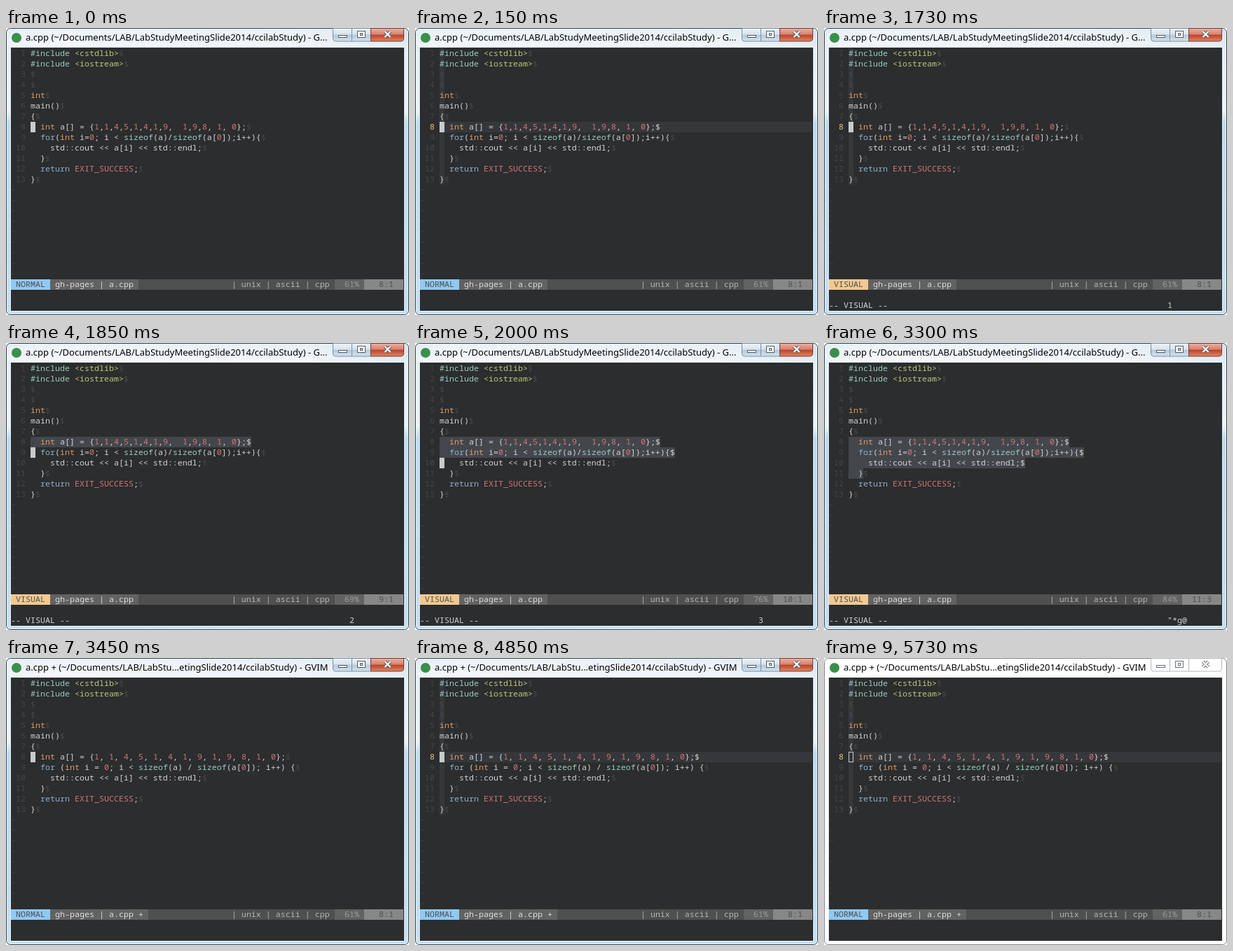
Write an HTML page that moves like this. It is 575 px wide and 410 px high and loops after 5.81 s.

```html
<!DOCTYPE html>
<html lang="en">
<head>
<meta charset="utf-8">
<title>Editor formatting demo</title>
<style>
  html, body { margin: 0; width: 100%; height: 100%; overflow: hidden; background: #fff; }
  svg { display: block; width: 575px; height: 410px; }
  text { white-space: pre; }
  .mono text { font: 11.667px "Noto Sans Mono", "DejaVu Sans Mono", monospace; fill: #d0d3d1; }
  .title { font: 13px "Noto Sans", "Open Sans", sans-serif; fill: #000; }
  .mono .dim { fill: #43474c; }
  .mono .lit { fill: #d0d3d1; }
  .mono .current { fill: #f1ca7d; }
  .mono .dark { fill: #2b2d2e; }
  .pre { fill: #9bcac4; }
  .str { fill: #bfc779; }
  .type { fill: #e09a69; }
  .num { fill: #d47474; }
  .key { fill: #90b0cb; }
</style>
</head>
<body>
<svg id="stage" viewBox="0 0 575 410">
  <defs>
    <linearGradient id="glass" x2="0" y2="1">
      <stop offset="0" stop-color="#d3e1ee"/>
      <stop offset=".07" stop-color="#e6eff7"/>
      <stop offset=".29" stop-color="#edf4fa"/>
      <stop offset=".33" stop-color="#bfdaf0"/>
      <stop offset="1" stop-color="#c6dff3"/>
    </linearGradient>
    <linearGradient id="glow" x2="1" y2="0">
      <stop offset="0" stop-color="#fff" stop-opacity=".4"/>
      <stop offset=".1" stop-color="#fff" stop-opacity=".6"/>
      <stop offset=".75" stop-color="#fff" stop-opacity=".5"/>
      <stop offset="1" stop-color="#fff" stop-opacity="0"/>
    </linearGradient>
    <linearGradient id="button" x2="0" y2="1">
      <stop offset="0" stop-color="#eef4f9"/>
      <stop offset=".48" stop-color="#d6e2ec"/>
      <stop offset=".5" stop-color="#b5c8d9"/>
      <stop offset="1" stop-color="#d3e3f0"/>
    </linearGradient>
    <linearGradient id="close" x2="0" y2="1">
      <stop offset="0" stop-color="#e9b3a4"/>
      <stop offset=".48" stop-color="#d4806c"/>
      <stop offset=".5" stop-color="#bb3f27"/>
      <stop offset="1" stop-color="#dc8a66"/>
    </linearGradient>
  </defs>
  <g id="frame"></g>
  <g id="editor" class="mono"></g>
</svg>
<script>
const LOOP = 5810, CHAR = 7, LINE = 15, LEFT = 7, RIGHT = 568, TOP = 29, CODE_LEFT = 35;
const STATUS_ROW = 23, COMMAND_ROW = 25;

const steps = [
  [0, {}],
  [150, { hold: true }],
  [1730, { visual: true, hold: true, command: '1' }],
  [1850, { visual: true, row: 9, command: '2' }],
  [2000, { visual: true, row: 10, command: '3' }],
  [2150, { visual: true, row: 11, command: '4' }],
  [2270, { visual: true, row: 11, col: 3, command: '4' }],
  [3300, { visual: true, row: 11, col: 3, command: '"*g@', cursor: false }],
  [3450, { tidy: true }],
  [4850, { tidy: true, hold: true }],
  [5730, { tidy: true, hold: true, idle: true }]
];

const messy = [
  '#include <cstdlib>', '#include <iostream>', '', '', 'int', 'main()', '{',
  '  int a[] = {1,1,4,5,1,4,1,9,  1,9,8, 1, 0};',
  '  for(int i=0; i < sizeof(a)/sizeof(a[0]);i++){',
  '    std::cout << a[i] << std::endl;',
  '  }', '  return EXIT_SUCCESS;', '}'
];
const formatted = messy.slice();
formatted[7] = '  int a[] = {1, 1, 4, 5, 1, 4, 1, 9, 1, 9, 8, 1, 0};';
formatted[8] = '  for (int i = 0; i < sizeof(a) / sizeof(a[0]); i++) {';

const escape = s => s.replace(/&/g, '&amp;').replace(/</g, '&lt;').replace(/>/g, '&gt;');
const rect = (x, y, w, h, fill, extra = '') =>
  `<rect x="${x}" y="${y}" width="${w}" height="${h}" fill="${fill}" ${extra}/>`;
const path = (d, fill, stroke, width = 1) =>
  `<path d="${d}" fill="${fill}" stroke="${stroke}" stroke-width="${width}"/>`;
const rowTop = row => TOP + (row - 1) * LINE;
const markup = (x, row, body, cls = '') =>
  `<text x="${x}" y="${rowTop(row) + 11}" class="${cls}">${body}</text>`;
const label = (x, row, text, cls) => markup(x, row, escape(text), cls);

const tokens = /(#include|\bsizeof\b)|(<\w+>)|(\bint\b)|(\b\d+\b|EXIT_SUCCESS)|(\b(?:return|for)\b)/g;
const classes = ['pre', 'str', 'type', 'num', 'key'];

function highlight(line) {
  let out = '', last = 0;
  for (const match of line.matchAll(tokens)) {
    const kind = classes[match.slice(1).findIndex(Boolean)];
    out += escape(line.slice(last, match.index)) +
      `<tspan class="${kind}">${escape(match[0])}</tspan>`;
    last = match.index + match[0].length;
  }
  return out + escape(line.slice(last));
}

function drawFrame({ tidy, idle }) {
  const edge = idle ? '#7d8287' : '#35424c';
  const glyph = idle ? '#6b7178' : '#515c68';
  const face = idle ? '#fff' : 'url(#button)';
  const line = idle ? '#b4b9be' : '#7d8f9f';
  const title = tidy
    ? 'a.cpp + (~/Documents/LAB/LabStu...etingSlide2014/ccilabStudy) - GVIM'
    : 'a.cpp (~/Documents/LAB/LabStudyMeetingSlide2014/ccilabStudy) - G...';
  return rect(.5, .5, 574, 409, idle ? '#fff' : 'url(#glass)', `rx="6" stroke="${edge}"`) +
    (idle ? '' :
      rect(1.5, 1.5, 572, 407, 'none', 'rx="5" stroke="#e2f7fd" stroke-opacity=".8"') +
      rect(2, 2, 571, 25, 'url(#glow)', 'rx="5"')) +
    rect(6.5, 27.5, 562, 377, 'none', `stroke="${idle ? '#f4f5f6' : '#e4f0f8'}"`) +
    '<circle cx="15" cy="14" r="7" fill="#3c8f4b"/>' +
    `<text class="title" x="28" y="18">${title}</text>` +
    path('M466.5 .5V15q0 4 4 4H493.5V.5Z', face, line) +
    path('M493.5 .5V19H520.5V.5Z', face, line) +
    path('M520.5 .5V19H563.5q4 0 4-4V.5Z', idle ? '#fff' : 'url(#close)', idle ? line : '#7b3a31') +
    rect(474.5, 10.5, 12, 3, '#fff', `stroke="${glyph}"`) +
    rect(501.5, 4.5, 11, 9, '#fff', `stroke="${glyph}"`) +
    rect(505.5, 7.5, 3, 3, face, `stroke="${glyph}"`) +
    path('M540.5 5L548.5 13M548.5 5L540.5 13', 'none', glyph, 4.5) +
    path('M540.5 5L548.5 13M548.5 5L540.5 13', 'none', '#fff', 2.4);
}

function drawStatus({ visual, tidy, row = 8, col = 1 }) {
  const y = rowTop(STATUS_ROW);
  let x = LEFT;
  const segment = (text, bg, fg) => {
    const w = text.length * CHAR;
    const out = rect(x, y, w, LINE, bg) +
      `<text x="${x}" y="${y + 11}" style="fill:${fg}">${text}</text>`;
    x += w;
    return out;
  };
  const file = ` gh-pages | a.cpp ${tidy ? '+ ' : ''}`;
  const percent = Math.floor(row / 13 * 100);
  return segment(visual ? ' VISUAL ' : ' NORMAL ', visual ? '#f2c991' : '#91c9f3', '#4f4f4f') +
    segment(file, '#626262', '#dcdcdc') +
    segment('| unix | ascii | cpp '.padStart(58 - file.length), '#4f4f4f', '#b4b4b4') +
    segment(`  ${percent}% `, '#626262', '#9c9c9c') +
    segment(` ${String(row).padStart(3)}:${String(col).padEnd(2)} `, '#878787', '#4f4f4f');
}

function drawEditor(state) {
  const { visual, hold, tidy, idle, row = 8, col = 1, command, cursor = true } = state;
  const lines = tidy ? formatted : messy;
  const x = CODE_LEFT + (col - 1) * CHAR, y = rowTop(row);
  let out = rect(LEFT, 28, RIGHT - LEFT, 376, '#2b2d2e');
  if (hold) out += rect(CODE_LEFT, TOP, CHAR, lines.length * LINE, '#35373b');
  if (hold && !visual) out += rect(CODE_LEFT, y, RIGHT - 1 - CODE_LEFT, LINE, '#35373b');

  lines.forEach((line, i) => {
    const n = i + 1, current = hold && n === row;
    const selected = visual && n >= 8 && n < row;
    const width = selected ? line.length + 1 : visual && n === row ? col : 0;
    if (width) out += rect(CODE_LEFT, rowTop(n), width * CHAR, LINE, '#43474c');
    out += label(LEFT, n, String(n).padStart(3), current ? 'current' : 'dim') +
      markup(CODE_LEFT, n, highlight(line)) +
      label(CODE_LEFT + line.length * CHAR, n, '$', selected || current && !visual ? 'lit' : 'dim');
  });
  for (let n = lines.length + 1; n < STATUS_ROW; n++) out += label(LEFT, n, '~', 'dim');

  if (idle) out += rect(x + .5, y + .5, CHAR - 1, LINE - 1, 'none', 'stroke="#c8cbc9"');
  else if (cursor) {
    out += rect(x, y, CHAR, LINE, '#c8cbc9') + label(x, row, lines[row - 1][col - 1], 'dark');
  }
  out += drawStatus(state);
  if (visual) {
    out += label(LEFT, COMMAND_ROW, '-- VISUAL --') +
      label(LEFT + 69 * CHAR, COMMAND_ROW, command);
  }
  return out;
}

const frame = document.getElementById('frame');
const editor = document.getElementById('editor');
const start = performance.now();
let shown;

function tick() {
  const time = (performance.now() - start) % LOOP;
  const state = steps.filter(([at]) => at <= time).pop()[1];
  if (state !== shown) {
    shown = state;
    frame.innerHTML = drawFrame(state);
    editor.innerHTML = drawEditor(state);
  }
  requestAnimationFrame(tick);
}
tick();
</script>
</body>
</html>
```
